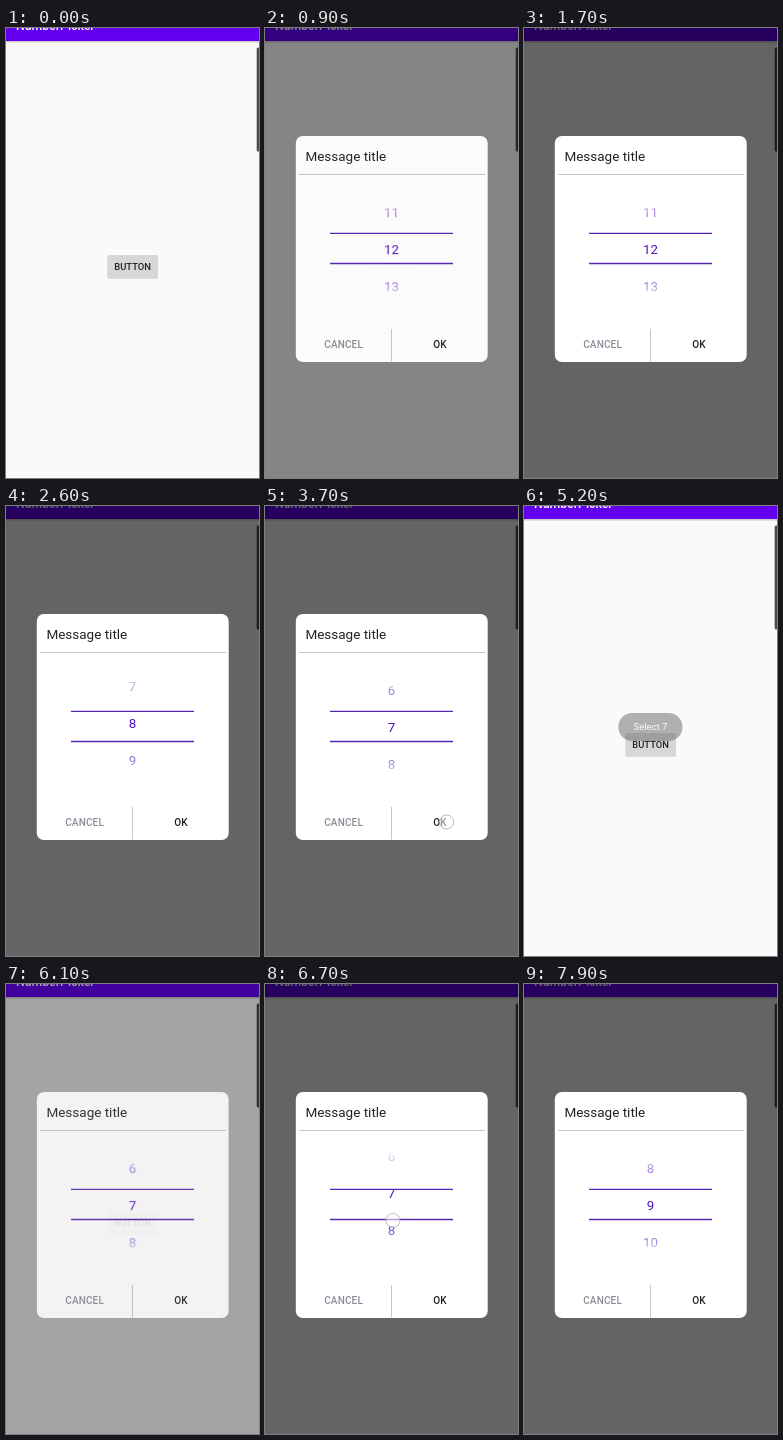
Recreate the animation shown at these times as an HTML page. Size 253 by 450 pixels, loop 8000 ms.

```html
<!DOCTYPE html>
<html lang="en">
<head>
<meta charset="utf-8">
<title>Number dialog</title>
<style>
  html, body { margin: 0; width: 100%; height: 100%; overflow: hidden; background: #fafafa; }
  svg { display: block; width: 100%; height: 100%; font-family: Roboto, "Open Sans", sans-serif; }
  .medium { font-weight: 500; }
  .mid { text-anchor: middle; }

  /* 1% of the loop is 80 ms */
  .dim, .dialog, .pop, .wheel, .toast, .tap, .press {
    animation: 8s linear infinite both;
  }
  .dim { animation-name: dim; }
  .dialog { animation-name: fade; }
  .pop { animation-name: pop; transform-origin: 126.5px 221px; }
  .wheel { animation-name: wheel; }
  .toast { animation-name: toast; }
  .press { animation-name: press; }
  .tap { fill: #fff; fill-opacity: .55; stroke: #b4b4b8; stroke-width: .9; }
  .open1 { animation-name: open1; }
  .drag1 { animation-name: drag1; }
  .ok { animation-name: ok; }
  .open2 { animation-name: open2; }
  .drag2 { animation-name: drag2; }

  @keyframes dim {
    0%, 6.86% { opacity: 0; }
    12.49%, 46.9% { opacity: .6; }
    48.6%, 73.04% { opacity: 0; }
    78.66%, 100% { opacity: .6; }
  }
  @keyframes fade {
    0% { opacity: 0; }
    6.86% { opacity: 0; animation-timing-function: cubic-bezier(.333, .83, .667, 1); }
    12.49%, 46.9% { opacity: 1; }
    48.4% { opacity: 0; }
    73.04% { opacity: 0; animation-timing-function: cubic-bezier(.333, .83, .667, 1); }
    78.66%, 100% { opacity: 1; }
  }
  @keyframes pop {
    0%, 6.86% { transform: scale(.94); animation-timing-function: cubic-bezier(.1, 1, .2, 1); }
    12.49%, 60% { transform: scale(1); }
    60.01% { transform: scale(.94); }
    73.04% { transform: scale(.94); animation-timing-function: cubic-bezier(.1, 1, .2, 1); }
    78.66%, 100% { transform: scale(1); }
  }
  @keyframes wheel {
    0% { transform: translateY(0); }
    21.9% { transform: translateY(0); animation-timing-function: cubic-bezier(.333, 0, .667, .333); }
    26.9% { transform: translateY(59px); animation-timing-function: cubic-bezier(.333, .667, .667, 1); }
    40% { transform: translateY(185px); }
    80.6% { transform: translateY(185px); animation-timing-function: cubic-bezier(.333, 0, .667, .333); }
    86.25% { transform: translateY(148px); animation-timing-function: cubic-bezier(.333, .9, .667, 1); }
    97.5%, 100% { transform: translateY(111px); }
  }
  @keyframes toast {
    0%, 48% { opacity: 0; }
    48.75% { opacity: .34; animation-timing-function: ease-out; }
    54.4%, 61.9% { opacity: 1; }
    68.1%, 100% { opacity: 0; }
  }
  @keyframes press {
    0%, 1.3% { opacity: 0; }
    2.8%, 5% { opacity: .12; }
    8%, 70% { opacity: 0; }
    71.2%, 72.4% { opacity: .12; }
    75%, 100% { opacity: 0; }
  }
  @keyframes open1 {
    0%, 1% { opacity: 0; }
    1.2%, 5% { opacity: 1; }
    7%, 100% { opacity: 0; }
  }
  @keyframes open2 {
    0%, 69.6% { opacity: 0; }
    69.9%, 72.4% { opacity: 1; }
    74.4%, 100% { opacity: 0; }
  }
  @keyframes ok {
    0%, 45.6% { opacity: 0; }
    46%, 47.6% { opacity: 1; }
    49.2%, 100% { opacity: 0; }
  }
  @keyframes drag1 {
    0%, 21.4% { opacity: 0; transform: translateY(0); }
    21.9% { opacity: 1; transform: translateY(0); animation-timing-function: cubic-bezier(.333, 0, .667, .333); }
    26.9% { opacity: 1; transform: translateY(59px); }
    28.6%, 100% { opacity: 0; transform: translateY(66px); }
  }
  @keyframes drag2 {
    0%, 80.2% { opacity: 0; transform: translateY(0); }
    80.6% { opacity: 1; transform: translateY(0); animation-timing-function: cubic-bezier(.333, 0, .667, .333); }
    86.25% { opacity: 1; transform: translateY(-37px); }
    88%, 100% { opacity: 0; transform: translateY(-40px); }
  }
</style>
</head>
<body>
<svg viewBox="0 0 253 450" preserveAspectRatio="none">
  <defs>
    <linearGradient id="shade" x2="0" y2="1">
      <stop offset="0" stop-color="#000" stop-opacity=".22"/>
      <stop offset="1" stop-color="#000" stop-opacity="0"/>
    </linearGradient>
    <linearGradient id="edges" gradientUnits="userSpaceOnUse" x1="0" y1="166" x2="0" y2="276">
      <stop offset="0" stop-color="#000"/>
      <stop offset=".36" stop-color="#fff"/>
      <stop offset=".64" stop-color="#fff"/>
      <stop offset="1" stop-color="#000"/>
    </linearGradient>
    <mask id="window" maskUnits="userSpaceOnUse" x="60" y="166" width="133" height="110" style="color-interpolation:sRGB">
      <rect x="60" y="166" width="133" height="110" fill="url(#edges)"/>
    </mask>
  </defs>

  <!-- screen -->
  <rect width="253" height="450" fill="#fafafa"/>
  <rect y="13" width="253" height="2.6" fill="url(#shade)"/>
  <rect width="253" height="13" fill="#6200ee"/>
  <text class="medium" x="9.9" y="1.8" font-size="12.3" fill="#fff">NumberPicker</text>
  <rect x="101.5" y="227.6" width="50.5" height="23.4" rx="1.6" fill="#000" opacity=".1"/>
  <rect x="101.5" y="227" width="50.5" height="23.4" rx="1.6" fill="#d6d7d7"/>
  <rect class="press" x="101.5" y="227" width="50.5" height="23.4" rx="1.6"/>
  <text class="medium mid" x="126.6" y="242.2" font-size="9.4" fill="#222">BUTTON</text>
  <rect x="250.7" y="19.5" width="6" height="104" rx="1.6" fill="#4a4a4a"/>

  <rect class="dim" width="253" height="450"/>

  <!-- dialog -->
  <g class="dialog"><g class="pop">
    <rect x="30.8" y="108" width="191.9" height="226" rx="7" fill="#fff"/>
    <text x="40.4" y="132.6" font-size="13.5" fill="#222">Message title</text>
    <path d="M34 146.5H220" stroke="#c9c9cd"/>
    <g mask="url(#window)">
      <g class="wheel mid" font-size="13.3" fill="#5210bd">
        <text x="126.5" y="-33.2">5</text>
        <text x="126.5" y="3.8">6</text>
        <text x="126.5" y="40.8">7</text>
        <text x="126.5" y="77.8">8</text>
        <text x="126.5" y="114.8">9</text>
        <text x="126.5" y="151.8">10</text>
        <text x="126.5" y="188.8">11</text>
        <text x="126.5" y="225.8">12</text>
        <text x="126.5" y="262.8">13</text>
        <text x="126.5" y="299.8">14</text>
      </g>
    </g>
    <path d="M65 205.3H188M65 235.5H188" stroke="#5b27b0" stroke-width="1.3"/>
    <path d="M126.5 301V333.5" stroke="#c4c4d2"/>
    <g class="medium mid" font-size="10" letter-spacing=".15">
      <text x="78.6" y="320.1" fill="#8c8c98">CANCEL</text>
      <text x="175" y="320.1" fill="#222">OK</text>
    </g>
  </g></g>

  <!-- toast -->
  <g class="toast">
    <rect x="94.3" y="207" width="64.2" height="28" rx="14" fill="#666"/>
    <text class="mid" x="126.4" y="224.3" font-size="9.5" fill="#fff">Select 7</text>
  </g>

  <!-- touches -->
  <circle class="tap open1" cx="132" cy="240" r="7"/>
  <circle class="tap drag1" cx="128" cy="196" r="7"/>
  <circle class="tap ok" cx="181.7" cy="316" r="7"/>
  <circle class="tap open2" cx="132" cy="240" r="7"/>
  <circle class="tap drag2" cx="128" cy="248" r="7"/>
</svg>
</body>
</html>
```
